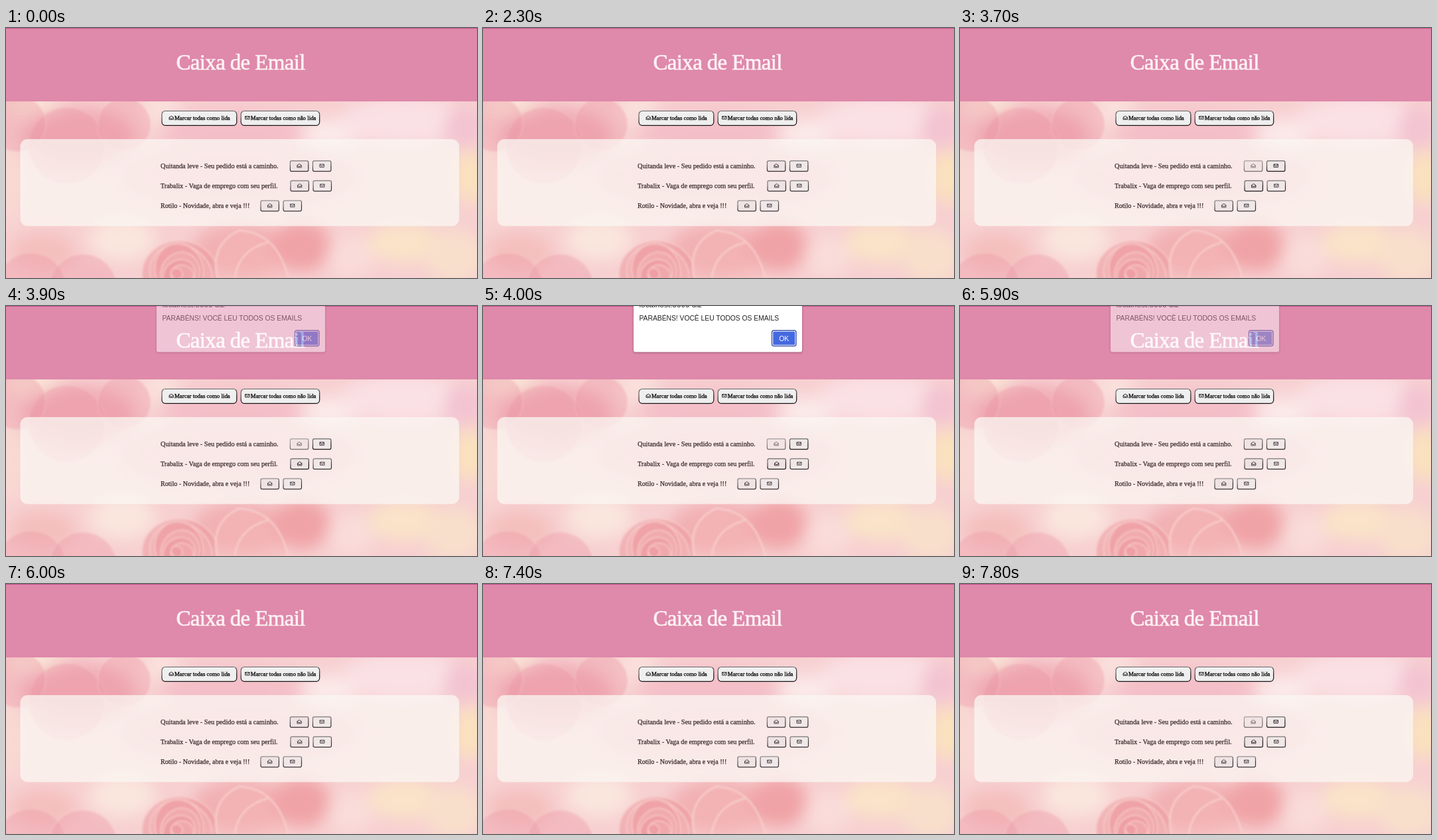
Animation of 710 by 378 pixels, one loop 8 s. Source, as an HTML page:

```html
<!DOCTYPE html>
<html lang="pt-BR">
<head>
<meta charset="utf-8">
<title>Caixa de Email</title>
<style>
  html, body { margin: 0; width: 100%; height: 100%; overflow: hidden; }
  svg { display: block; width: 100%; height: 100%; }
  text { font-family: "Liberation Serif", serif; fill: #3a2a2c; stroke: #3a2a2c; stroke-width: .25px; }
  .title { font-size: 33px; letter-spacing: -.02em; fill: #fdf2f3; stroke: #fdf2f3; stroke-width: .7px; }
  .label { font-size: 8.85px; fill: #111; stroke: #111; stroke-width: .35px; }
  .dialog text { font-family: "Liberation Sans", sans-serif; fill: #222; stroke: none; }
  .icon { fill: none; stroke: #1c1719; stroke-width: .9; stroke-linejoin: round; }
</style>
</head>
<body>
<svg id="stage" viewBox="0 0 710 378" preserveAspectRatio="none">
  <defs>
    <linearGradient id="edge" x2=".35" y2="1">
      <stop offset=".3" stop-color="#666"/><stop offset=".8" stop-color="#181416"/>
    </linearGradient>
    <filter id="soft" x="-50%" y="-50%" width="200%" height="200%"><feGaussianBlur stdDeviation="12"/></filter>
    <filter id="petalBlur"><feGaussianBlur stdDeviation="1.6"/></filter>
    <filter id="shadow"><feDropShadow dx="0" dy="1" stdDeviation="1.5" flood-color="#50203a" flood-opacity=".55"/></filter>
    <path id="openMail" d="M-3.2-.6 0-2.7 3.2-.6V2.7H-3.2ZM-3.2 0 0 1.5 3.2 0"/>
    <path id="closedMail" d="M-3.2-2.2H3.2V2.2H-3.2ZM-3.2-1.6 0 .6 3.2-1.6"/>
  </defs>

  <rect width="710" height="378" fill="#f7d0d1"/>
  <g id="washes" filter="url(#soft)"></g>
  <g id="discs" filter="url(#petalBlur)"></g>
  <g id="rose" filter="url(#petalBlur)" fill="none"></g>

  <rect width="710" height="111" fill="#df89ab"/>
  <rect width="710" height="1" fill="#c44f8c"/>
  <text class="title" x="256.5" y="62.5">Caixa de Email</text>
  <rect x="21.5" y="168" width="661.5" height="131.5" rx="11" fill="#fbf8f5" fill-opacity=".74"/>
  <g id="controls"></g>

  <g id="dialog" class="dialog" opacity="0">
    <rect x="227" y="-20" width="254" height="89.5" rx="3" fill="#fff" filter="url(#shadow)"/>
    <text x="235.5" y="1.6" font-size="11.8">localhost:3000 diz</text>
    <text x="235.5" y="22.3" font-size="10.3">PARABÉNS! VOCÊ LEU TODOS OS EMAILS</text>
    <rect x="435.5" y="37" width="36.5" height="23.5" rx="3" fill="#fff" stroke="#3c57ad" stroke-width="1.4"/>
    <rect id="ok" x="437.3" y="38.8" width="33" height="20" rx="1.5"/>
    <text x="453.8" y="52.6" font-size="10.5" text-anchor="middle" style="fill:#fff">OK</text>
  </g>
</svg>
<script>
const $ = id => document.getElementById(id);

function add(parent, tag, attrs, text = "") {
  const node = document.createElementNS("http://www.w3.org/2000/svg", tag);
  for (const name in attrs) node.setAttribute(name, attrs[name]);
  node.textContent = text;
  return parent.appendChild(node);
}

// Watercolour backdrop: x, y, rx, ry, colour
[
  [40, 118, 45, 18, "#fae6d8"], [110, 165, 85, 45, "#f0abb5"],
  [235, 125, 30, 30, "#fae0dc"], [340, 155, 110, 30, "#f4bfc8"],
  [490, 160, 45, 22, "#fbeaea"], [600, 140, 95, 35, "#fae1e5"],
  [690, 150, 30, 30, "#f3c3d1"], [700, 225, 25, 40, "#fae2bd"],
  [5, 235, 22, 60, "#f9d9d3"], [175, 320, 50, 32, "#fae6dd"],
  [55, 340, 50, 30, "#f4bfbd"], [355, 335, 75, 40, "#f2b0b3"],
  [445, 330, 45, 38, "#f0a3a6"], [520, 345, 35, 32, "#f9dcda"],
  [600, 325, 55, 30, "#fae3c8"], [675, 345, 45, 40, "#f8dfcb"],
  [350, 225, 180, 50, "#f3bcc2"]
].forEach(([cx, cy, rx, ry, fill]) => add($("washes"), "ellipse", { cx, cy, rx, ry, fill }));

[
  [92, 178, 58], [178, 146, 40], [18, 145, 42],
  [38, 392, 52], [116, 393, 51]
].forEach(([cx, cy, r]) => add($("discs"), "circle",
  { cx, cy, r, fill: "#ec96a3", "fill-opacity": .36, stroke: "#f9d3d0", "stroke-opacity": .5 }));

for (let i = 0; i < 7; i++) {
  const size = 57 - i * 8;
  add($("rose"), "ellipse", {
    cx: 262 + 4 * Math.sin(i * 2.2), cy: 372 - i, rx: size, ry: size * .88,
    fill: i % 2 ? "#f4b4b6" : "#ec949b", "fill-opacity": .5,
    stroke: "#f9cdca", "stroke-width": 1.5, transform: `rotate(${i * 37} 262 370)`
  });
}
add($("rose"), "path", {
  d: "M318 378Q308 325 352 306Q410 310 425 378M345 378Q350 336 395 324",
  fill: "#f4b3b5", "fill-opacity": .4, stroke: "#f9d3d1", "stroke-width": 2
});

function button(x, y, width, height, radius, fill) {
  const group = add($("controls"), "g", {});
  add(group, "rect", { x, y, width, height, rx: radius, fill, stroke: "url(#edge)", "stroke-width": 1.2 });
  return group;
}

function icon(parent, name, x, y) {
  add(parent, "use", { href: "#" + name, class: "icon", transform: `translate(${x} ${y})` });
}

function bulkButton(x, width, mail, iconX, labelX, label) {
  const group = button(x, 125.5, width, 21.8, 5, "#efefef");
  icon(group, mail, iconX, 135.7);
  add(group, "text", { class: "label", x: labelX, y: 139.3 }, label);
}
bulkButton(235, 112.8, "openMail", 249.2, 254, "Marcar todas como lida");
bulkButton(354.2, 118.5, "closedMail", 363.8, 368.8, "Marcar todas como não lida");

const rows = [
  ["Quitanda leve - Seu pedido está a caminho.", 10.25, 428.4],
  ["Trabalix - Vaga de emprego com seu perfil.", 10.2, 429],
  ["Rotilo - Novidade, abra e veja !!!", 10.1, 384]
].map(([label, size, x], i) => {
  const y = 200.8 + i * 30.1;
  add($("controls"), "text", { x: 233, y: y + 11.4, "font-size": size }, label);
  return ["openMail", "closedMail"].map((mail, side) => {
    const left = x + side * 34.1;
    const group = button(left, y, 27.4, 15.8, 2.2, side ? "#efe8e8" : "#eee2e3");
    icon(group, mail, left + 13.7, y + 7.4);
    group.setAttribute("opacity", .85);
    return group;
  });
});

const ramp = (t, from, to) => Math.min(1, Math.max(0, (t - from) / (to - from)));
const setOpacity = (node, value) => node.setAttribute("opacity", value);

function render(now) {
  const t = Math.floor(now % 8000 / 100) * 100;
  const read = ramp(t, 3200, 3700) - ramp(t, 5700, 6000) + ramp(t, 7300, 7800);
  setOpacity(rows[0][0], .87 - .29 * read);
  setOpacity(rows[0][1], .85 + .12 * read);
  setOpacity(rows[1][0], .85 + .12 * read);

  setOpacity($("dialog"), ramp(t, 3800, 4000) - ramp(t, 5800, 6000));
  const hover = ramp(t, 5400, 5800);
  $("ok").setAttribute("fill", `rgb(${68 + 26 * hover},${104 + 24 * hover},${224 - 4 * hover})`);
  requestAnimationFrame(render);
}
render(performance.now());
</script>
</body>
</html>
```
